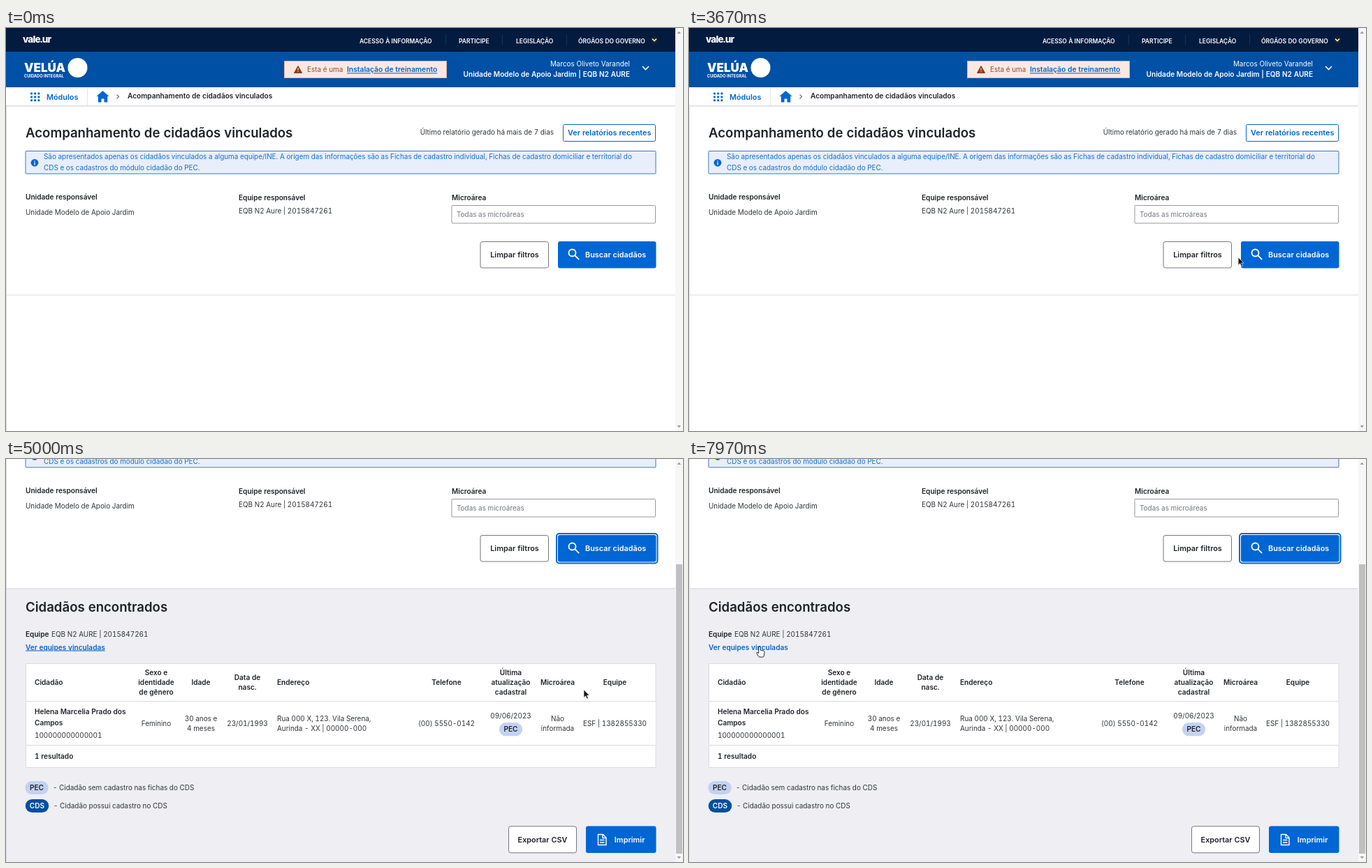
Animation, 969 px wide and 578 px high, one loop 8 s. Source, as an HTML page:

```html
<!DOCTYPE html>
<html lang="pt-BR">
<head>
<meta charset="utf-8">
<title>Acompanhamento de cidadãos vinculados</title>
<style>
  html, body { margin: 0; width: 100%; height: 100%; overflow: hidden; background: #fff; }
  svg { display: block; width: 969px; height: 578px; }
  text {
    font: 9.91px Inter, "Noto Sans", sans-serif; fill: #31343a;
    font-optical-sizing: none; font-variant-numeric: tabular-nums; white-space: pre;
  }
  .b { font-size: 10.08px; font-weight: 600; fill: #1f2229; }
  .title { font-size: 18.6px; font-weight: 600; fill: #1f2229; }
  .button { font-size: 10.85px; font-weight: 600; fill: #1f2229; }
  .nav { font-size: 8.5px; font-weight: 600; }
  .mid { text-anchor: middle; }
  .end { text-anchor: end; }
  .blue { fill: #0066d0; }
  .info { fill: #1670cb; }
  .hint { fill: #73767c; }
  .white { fill: #fff; }
  .link { fill: #0066cc; text-decoration: underline; }
  .line { fill: none; stroke-width: 1.6; }
</style>
</head>
<body>
<svg viewBox="0 0 969 578">
  <g id="page"></g>
  <g id="scrollbar">
    <rect x="958" width="11" height="578" fill="#f7f7f8"/>
    <rect id="thumb" x="959" y="11" width="9" height="415" fill="#c0c0c2"/>
    <path d="M960.5 8l2.8-3.2 2.8 3.2zM960.5 570l2.8 3.2 2.8-3.2z" fill="#9a9a9c"/>
  </g>
  <g id="cursor">
    <path id="arrow" d="M0 0V11.2L2.6 8.8 4.5 13 6.3 12.2 4.5 8.1H8Z" fill="#15171c" stroke="#fff" stroke-width=".6"/>
    <path id="hand" d="M-1.3 1.2Q-1.3 0 0 0T1.3 1.2V5.2L5.4 6Q7.2 6.4 7 8.2L6.4 13Q6.2 15 4.5 15H0Q-1 15-1.6 14L-4 9.7Q-4.3 8.3-3 8.3L-1.3 9.6Z" fill="#fff" stroke="#22252b"/>
  </g>
</svg>
<script>
const $ = id => document.getElementById(id);
const text = (x, y, string, kind = '', id = '') =>
  `<text x="${x}" y="${y}" class="${kind}" id="${id}">${string}</text>`;
const lines = (x, y, list, kind, step = 13.6) =>
  list.map((s, i) => text(x, y + (i - (list.length - 1) / 2) * step, s, kind)).join('');
const box = (x, y, w, h, fill, stroke = 'none', r = 0, id = '') =>
  `<rect x="${x}" y="${y}" width="${w}" height="${h}" rx="${r}" fill="${fill}" stroke="${stroke}" id="${id}"/>`;
const stroke = (d, color, width = 1.6) =>
  `<path class="line" d="${d}" stroke="${color}" style="stroke-width:${width}"/>`;
const pill = (x, y, label, fill, kind = '') =>
  box(x - 16.7, y - 9.6, 33.4, 19.2, fill, 'none', 9.6) + text(x, y + 3.6, label, 'b mid ' + kind);

const BLUE = '#0066d4', DARK_BLUE = '#004f9f', GRAY = '#eeeef3', BORDER = '#dbdbe0';

function header() {
  let dots = '';
  for (let i = 0; i < 9; i++) dots += box(35 + i % 3 * 5.2, 92.5 + (i / 3 | 0) * 4.9, 3, 3, BLUE, 'none', .8);
  return box(0, 0, 958, 34, '#041b40') + box(0, 34, 958, 51, '#0050a5')
    + text(24, 21, 'vale.ur', 'white', 'site')
    + text(506, 21.7, 'ACESSO À INFORMAÇÃO', 'nav white') + text(648, 21.7, 'PARTICIPE', 'nav white')
    + text(730, 21.7, 'LEGISLAÇÃO', 'nav white') + text(819, 21.7, 'ÓRGÃOS DO GOVERNO', 'nav white')
    + stroke('M629.5 10V24M710.5 10V24M802.5 10V24', '#1b3358', 1)
    + '<circle cx="928" cy="17" r="5.5" fill="#1b2026"/>' + stroke('M925 15.5l3 3 3-3', '#fff')
    + text(26, 63, 'VELÚA', 'white', 'brand') + text(26, 70.5, 'CUIDADO INTEGRAL', 'white', 'tagline')
    + '<circle cx="102.5" cy="57" r="14" fill="#fff"/>'
    + box(398.5, 47.5, 232, 24, '#fce8e3', '#e9ae98')
    + '<path d="M418 54.5l5.5 10h-11z" fill="#8f3a14" stroke="#8f3a14" stroke-linejoin="round"/>'
    + stroke('M418 57.5v3.2M418 62v1.3', '#fce8e3', 1.2)
    + text(431, 63.4, 'Esta é uma', '', 'notice') + text(488, 63.4, 'Instalação de treinamento', 'b link', 'install')
    + text(893, 55, 'Marcos Oliveto Varandel', 'end white')
    + text(893, 70.3, 'Unidade Modelo de Apoio Jardim | EQB N2 AURE', 'b end white')
    + stroke('M911 55l4.5 4.5 4.5-4.5', '#fff')
    + box(0, 85, 958, 27, '#fff') + box(0, 111, 958, 1.5, '#dcdde1')
    + dots + text(58, 102.5, 'Módulos', 'button blue')
    + stroke('M116.5 86V111', '#e3e4e7', 1)
    + '<path d="M138.5 90l9 8h-2.3v8.5h-4.7v-5h-4v5h-4.700V98h-2.300z" fill="#0066d4"/>'
    + stroke('M158.500 95.500l3 3-3 3', '#6e7178', 1.2)
    + text(174, 101.400, 'Acompanhamento de cidadãos vinculados', 'b');
}

function filters() {
  return text(28, 157, 'Acompanhamento de cidadãos vinculados', 'title')
    + text(784, 153.4, 'Último relatório gerado há mais de 7 dias', 'end')
    + box(797.5, 138.5, 132, 24, '#fff', BLUE, 2) + text(863.7, 154.2, 'Ver relatórios recentes', 'button mid blue')
    + box(28, 176.5, 902, 32.5, '#e8eefb', '#3d79c2', 1)
    + '<circle cx="41" cy="193.3" r="5.4" fill="#0066d4"/>' + stroke('M41 190.2v1.4M41 192.6v3.8', '#fff', 1.3)
    + text(54, 188, 'São apresentados apenas os cidadãos vinculados a alguma equipe/INE. A origem das informações são as Fichas de cadastro individual, Fichas de cadastro domiciliar e territorial do', 'info')
    + text(54, 204, 'CDS e os cadastros do módulo cidadão do PEC.', 'info')
    + text(28, 246.3, 'Unidade responsável', 'b') + text(28, 267.5, 'Unidade Modelo de Apoio Jardim')
    + text(333, 246.8, 'Equipe responsável', 'b') + text(333, 265.6, 'EQB N2 Aure | 2015847261')
    + text(638, 246.8, 'Microárea', 'b')
    + box(638, 254.5, 291.5, 25.5, '#fff', '#96999f', 1) + text(645, 270.7, 'Todas as microáreas', 'hint')
    + box(679, 306.5, 97.5, 37.5, '#fff', '#74777d', 3) + text(728, 328.7, 'Limpar filtros', 'button mid')
    + box(788, 304, 144.5, 42.5, '#fff', BLUE, 4, 'ring')
    + box(790, 306, 140.5, 38.5, BLUE, 'none', 3, 'search')
    + stroke('M815.500 322.500a5 5 0 1 1-10 0a5 5 0 1 1 10 0M814.200 326.200l6 6', '#fff', 1.8)
    + text(829, 328.700, 'Buscar cidadãos', 'button white')
    + box(0, 382.5, 958, 1, BORDER);
}

function results() {
  const head = 521, row = 579.7;
  return box(0, 383, 958, 392, GRAY) + box(0, 382.5, 958, 1, BORDER)
    + text(28, 415.7, 'Cidadãos encontrados', 'title')
    + text(28, 451.8, 'Equipe', 'b') + text(65, 451.8, 'EQB N2 AURE | 2015847261')
    + text(28, 470.5, 'Ver equipes vinculadas', 'b link', 'teams')
    + box(28.5, 490.5, 901.5, 149, '#fff', BORDER)
    + box(29, 545, 900.5, 62, '#fff', 'none', 0, 'row')
    + stroke('M28 544.5H930M28 607.500H930', BORDER, 1)
    + text(41, head, 'Cidadão', 'b') + lines(215, head, ['Sexo e', 'identidade', 'de gênero'], 'b mid')
    + text(279, head, 'Idade', 'b mid') + lines(345.5, head, ['Data de', 'nasc.'], 'b mid')
    + text(388, head, 'Endereço', 'b') + text(630.5, head, 'Telefone', 'b mid')
    + lines(722.5, head, ['Última', 'atualização', 'cadastral'], 'b mid')
    + text(789.500, head, 'Microárea', 'b mid') + text(871.5, head, 'Equipe', 'b mid')
    + lines(41, 570.5, ['Helena Marcelia Prado dos', 'Campos'], 'b', 16) + text(41, 597.2, '100000000000001')
    + text(215, row, 'Feminino', 'mid') + lines(279, row, ['30 anos e', '4 meses'], 'mid')
    + text(345.5, row, '23/01/1993', 'mid')
    + lines(388, row, ['Rua 000 X, 123. Vila Serena,', 'Aurinda - XX | 00000-000'])
    + text(630.5, row, '(00) 5550-0142', 'mid') + text(722.5, 568.5, '09/06/2023', 'mid')
    + pill(722.5, 584.700, 'PEC', '#c3d2f1')
    + lines(789.5, row, ['Não', 'informada'], 'mid') + text(871.5, row, 'ESF | 1382855330', 'mid')
    + text(41, 626.7, '1 resultado', 'b')
    + pill(44, 668.5, 'PEC', '#c3d2f1') + text(67, 672.3, '- Cidadão sem cadastro nas fichas do CDS')
    + pill(44.5, 694.5, 'CDS', DARK_BLUE, 'white') + text(68, 698.2, '- Cidadão possui cadastro no CDS')
    + box(719.5, 723.8, 97, 38, '#fff', '#74777d', 3) + text(768, 746.7, 'Exportar CSV', 'button mid')
    + box(830, 723.5, 100.5, 38.5, BLUE, 'none', 3)
    + stroke('M847.500 735.500h7l4.500 4.500v10.500h-11.500zM854 736v4.500h4.500M850 743.500h6.500M850 747h6.500', '#fff', 1.4)
    + text(892.7, 746.7, 'Imprimir', 'button mid white');
}

$('page').innerHTML = header() + filters() + `<g id="results">${results()}</g>` + box(0, 112, 1, 663, '#dedfe3');
$('site').style.cssText = 'font-size:13.5px;font-weight:800;letter-spacing:-.8px';
$('brand').style.cssText = 'font-size:17px;font-weight:900';
$('tagline').style.cssText = 'font-size:5.7px;font-weight:700';
$('notice').style.fill = '#8d4c37';
$('install').style.fontSize = '10.3px';

// Cursor waypoints: time, x, y. Equal neighbours are rests.
const path = [
  [1000, 310, -14], [1250, 365, 125], [1500, 540, 245], [1800, 510, 278], [2000, 400, 306],
  [2180, 288, 255], [2330, 365, 203], [2480, 468, 280], [2600, 458, 297], [2700, 457, 296],
  [3100, 457, 296], [3450, 640, 310], [3800, 828, 335], [4600, 828, 335], [4640, 825, 333],
  [4770, 825, 333], [5000, 827, 331], [5870, 827, 331], [6330, 883, 398], [6670, 870, 407],
  [6970, 824, 392], [7170, 824, 392], [7520, 470, 335], [7900, 101, 269], [8000, 101, 269]
];

function slope(i, axis) {
  const before = path[i - 1], here = path[i], after = path[i + 1];
  if (!before || !after) return 0;
  const resting = p => p[1] === here[1] && p[2] === here[2];
  return resting(before) || resting(after) ? 0 : (after[axis] - before[axis]) / (after[0] - before[0]);
}

function cursorAt(t) {
  const i = Math.max(0, path.findIndex(p => p[0] > t) - 1);
  const a = path[i], b = path[i + 1], span = b[0] - a[0];
  const u = Math.max(0, (t - a[0]) / span), v = 1 - u;
  return [1, 2].map(k => v * v * (1 + 2 * u) * a[k] + u * u * (3 - 2 * u) * b[k]
    + span * u * v * (v * slope(i, k) - u * slope(i + 1, k)));
}

const scrollSteps = [[4830, 197], [4770, 93.5], [4700, 45], [4630, 12], [0, 0]];
const show = (id, on) => $(id).style.visibility = on ? 'visible' : 'hidden';

function draw() {
  const t = performance.now() % 8000;
  const scroll = scrollSteps.find(([start]) => t >= start)[1];
  const [x, y] = cursorAt(t);
  const inside = (left, top, right, bottom) => x >= left && x <= right && y >= top && y <= bottom;
  const onSearch = t < 4830 && inside(790, 306, 930, 344);
  const onLink = t > 7170 && inside(28, 262, 141, 278);
  const onRow = scroll === 197 && inside(28, 348, 930, 410);
  const found = t >= 4000;
  const pointing = onLink || onSearch && t < 4630;

  $('page').setAttribute('transform', `translate(0 ${-scroll})`);
  $('thumb').setAttribute('y', 11 + scroll * 140 / 197);
  $('search').setAttribute('fill', onSearch ? DARK_BLUE : BLUE);
  $('ring').setAttribute('stroke-width', 2);
  $('row').setAttribute('fill', onRow ? GRAY : '#fff');
  $('teams').style.textDecoration = onLink ? 'none' : 'underline';
  $('cursor').setAttribute('transform', `translate(${x} ${y})`);
  show('ring', t >= 3930);
  show('results', found);
  show('thumb', found);
  show('arrow', t >= 1000 && !pointing);
  show('hand', pointing);
  requestAnimationFrame(draw);
}
draw();
</script>
</body>
</html>
```
